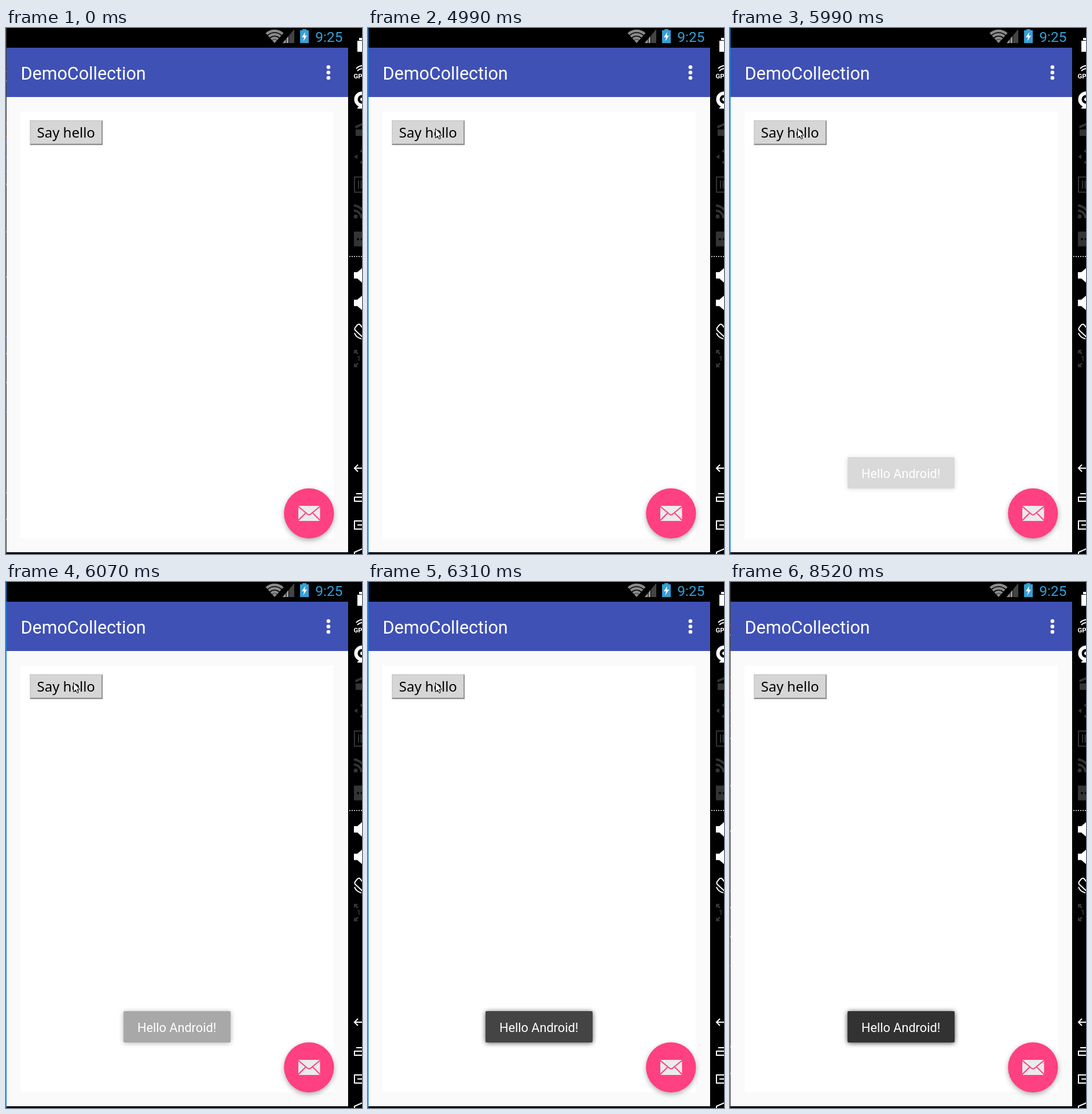
Write an HTML page that moves like this. It is 615 by 907 pixels and loops after 8770 ms.

```html
<!DOCTYPE html>
<html lang="en">
<head>
<meta charset="utf-8">
<title>Say hello</title>
<style>
  html, body { margin: 0; width: 100%; height: 100%; overflow: hidden; background: #000; }
  svg { display: block; font-family: Roboto, sans-serif; }
  #fab { filter: drop-shadow(0 3px 4px rgba(0, 0, 0, .33)); }
  #toast rect { filter: drop-shadow(0 1px 4px rgba(0, 0, 0, .75)); }
  .line { fill: none; stroke: #fff; stroke-width: 2; }
  .dim { fill: #343434; }
  .dimLine { fill: none; stroke: #343434; stroke-width: 2; }
</style>
</head>
<body>
<svg width="615" height="907" viewBox="0 0 615 907">
  <rect width="615" height="907"/>

  <!-- app -->
  <rect x="1" y="34" width="590" height="85" fill="#3f51b5"/>
  <rect x="1" y="119" width="590" height="785" fill="#fafafa"/>
  <rect x="25.5" y="144" width="540.5" height="736" fill="#fff"/>
  <text x="25.5" y="88.5" font-size="30.5" fill="#fff">DemoCollection</text>
  <g fill="#fff"><circle cx="557" cy="67.5" r="3.3"/><circle cx="557" cy="76.7" r="3.3"/><circle cx="557" cy="86" r="3.3"/></g>

  <!-- status bar -->
  <g id="wifi" fill="none" stroke="#8a8a8a" stroke-width="4.4"></g>
  <path d="M478 26L498 2V26Z" fill="#444"/>
  <path d="M478 26L488 14V26Z" fill="#9a9a9a"/>
  <path d="M484 17V26M488.5 12V26" stroke="#000"/>
  <path d="M508 4H512V2H519V4H523V26H508Z" fill="#34a0d6"/>
  <path d="M517 7L511 16H515L513.5 23L520 13H516Z" fill="#fff"/>
  <text x="534.2" y="24" font-size="24.6" fill="#35a0d6">9:25</text>

  <!-- button -->
  <rect x="41" y="159" width="126" height="43" rx="1.5" fill="#d6d6d6"/>
  <path id="lit" d="M41 202V159H167L165 161H43V200Z"/>
  <path id="shade" d="M167 159V202H41L43 199.5H165V161Z"/>
  <text x="53.5" y="188.5" font-size="24" font-family="Noto Sans, sans-serif">Say hello</text>

  <!-- mail button -->
  <circle id="fab" cx="523.4" cy="837" r="43.2" fill="#ff4081"/>
  <rect x="505" y="824" width="37.5" height="26" rx="1.5" fill="#ebebeb"/>
  <path d="M505 825L521 838.5Q523.5 840.5 526 838.5L542.5 825M505 849L517.5 836.5M542.5 849L530 836.5" fill="none" stroke="#ff4081" stroke-width="2"/>

  <g id="toast">
    <rect x="203" y="740" width="185" height="54" rx="2" fill="#323232"/>
    <text x="227" y="775.5" font-size="21.7" fill="#fff">Hello Android!</text>
  </g>

  <!-- side tools -->
  <g fill="#fff">
    <path d="M610 17H615V21H610ZM607 22H615V41H607Z"/>
    <path d="M605 70Q610 65 616 65M607 74Q611 70 616 70" class="line"/>
    <text x="600.5" y="87" font-size="11.5" font-weight="700">GPS</text>
    <circle cx="615" cy="123" r="13.5"/>
    <circle cx="615" cy="123" r="7.5" fill="#000"/>
    <circle cx="615" cy="123" r="3"/>
    <path d="M607 138Q610 134 615 134V139H607Z"/>
    <path id="speaker" d="M601 421H607L615 414V439L607 432H601Z"/>
    <use href="#speaker" y="47.5"/>
  </g>
  <path class="dim" d="M603 169L615 164V168L604 173ZM604 175H615V186H604ZM601 222L607 218V226ZM611 213L615 209V215ZM611 231L615 235V229Z"/>
  <path class="dimLine" d="M616 257H602V283H616M609 263V277M613.5 263V277"/>
  <path class="dimLine" style="stroke-width:4" d="M601 306A22 22 0 0 1 620 322M601 315A13 13 0 0 1 614 328"/>
  <circle class="dim" cx="604" cy="325" r="3.5"/>
  <rect class="dim" x="601" y="351" width="14" height="25.5"/>
  <circle cx="608" cy="364" r="2"/><circle cx="614.5" cy="364" r="2"/>
  <path d="M593 394H615" stroke="#bbb" stroke-width="2" stroke-dasharray="2 2"/>
  <path class="line" d="M616 517L611 511Q609 510 607 512L603 517Q602 519 603 521L616 533M602 526Q605 534 614 536"/>
  <path class="dim" d="M601 555H608L606 558L609 561L607 563L604 560L601 562ZM601 585H608L606 582L609 579L607 577L604 580L601 578Z"/>
  <text class="dim" x="606" y="574" font-size="12" font-weight="700">1</text>
  <path class="line" d="M616 759H602M608 753L602 759L608 765"/>
  <path class="line" d="M616 809H602V816H616M605 803H616"/>
  <path class="line" d="M616 850H602V864H616M607 857H616"/>
  <path class="line" d="M602 908V904L616 898"/>

  <!-- window edge -->
  <rect id="edge" width="1" height="907"/>
  <g id="specks"></g>

  <path id="cursor" d="M.5 .5V16.5L4.3 13L7 18.5L9.3 17.5L6.8 12H11.5Z" fill="#fff" stroke="#000"/>
</svg>
<script>
const $ = id => document.getElementById(id);
const LOOP = 8770;

const arc = r => {
  const dx = r * Math.sin(.73), y = 26 - r * Math.cos(.73);
  return `<path d="M${464 - dx} ${y}A${r} ${r} 0 0 1 ${464 + dx} ${y}"/>`;
};
$('wifi').innerHTML = [21, 15, 9].map(arc).join('') + '<path d="M464 26L460 21.5Q464 18 468 21.5Z" fill="#8a8a8a" stroke="none"/>';

const marks = { '#a54848': [73, 163, 186], '#5555bb': [195, 221, 246, 531, 660], '#888': [90, 268, 350, 428, 560, 610, 800, 846] };
$('specks').innerHTML = Object.entries(marks).map(([color, ys]) =>
  ys.map(y => `<rect y="${y}" width="1" height="3" fill="${color}"/>`).join('')).join('');

const fade = [[5910, .03], [5990, .18], [6070, .42], [6140, .65], [6230, .81], [6310, .91], [6460, 1]];

const bezier = (a, b, c, d, u) => {
  const v = 1 - u;
  return a * v ** 3 + 3 * b * v * v * u + 3 * c * v * u * u + d * u ** 3;
};

// Pointer position, or null while it is off the stage
function pointer(t) {
  if (t < 70 || t >= 6860) return null;
  if (t < 6460) {
    const u = t < 330 ? 0 : Math.min(7, Math.floor((t - 330) / 68) + 1) / 7;
    return [bezier(470, 400, 130, 116, u), bezier(755, 500, -52, 173, u)];
  }
  const u = (Math.floor((t - 6460) / 80) + 1) / 5;
  const e = u * u * (3 - 2 * u);
  return [116 + 449 * e, 173 + 716 * e];
}

function draw(now) {
  const t = now % LOOP;
  const p = pointer(t);
  $('cursor').style.display = p ? '' : 'none';
  if (p) $('cursor').setAttribute('transform', `translate(${p.map(Math.round)})`);

  const focused = t >= 4990 && t < 8520;
  $('edge').setAttribute('fill', focused ? '#0f80d7' : '#3a3a3a');
  $('specks').style.display = focused ? 'none' : '';

  const pressed = t >= 5440 && t < 5910;
  $('lit').setAttribute('fill', pressed ? '#929292' : '#cdcdcd');
  $('shade').setAttribute('fill', pressed ? '#cdcdcd' : '#929292');

  $('toast').setAttribute('opacity', fade.reduce((o, [at, value]) => t >= at ? value : o, 0));
  requestAnimationFrame(draw);
}
draw(0);
</script>
</body>
</html>
```
